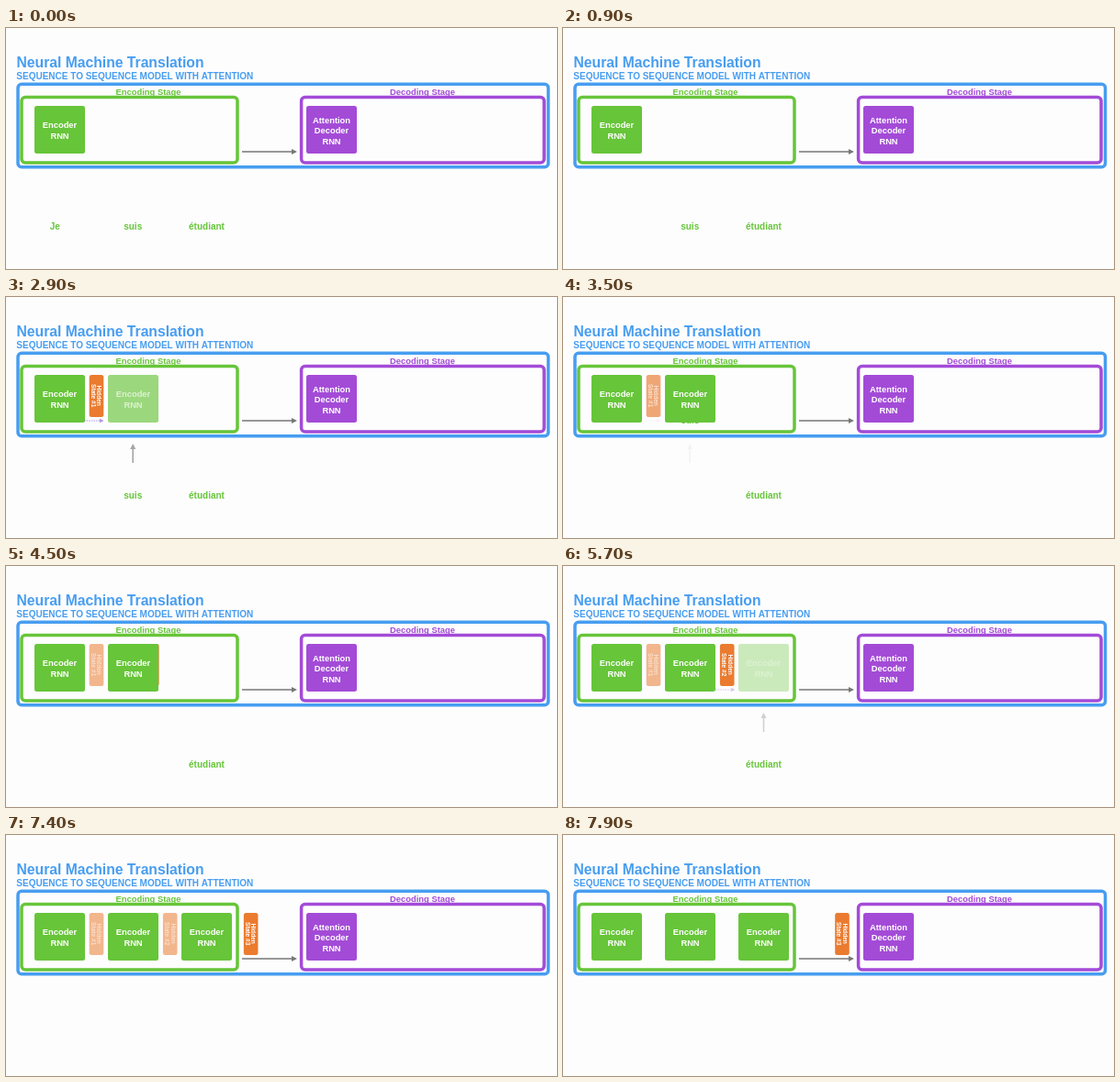
Animation of 600x263 px, one loop 8000 ms. Source, as an HTML page with a canvas:

```html
<!DOCTYPE html>
<html lang="en">
<head>
<meta charset="utf-8">
<title>Neural Machine Translation</title>
<style>
html, body { margin: 0; width: 100%; height: 100%; overflow: hidden; background: #fdfdfe; }
canvas { display: block; }
</style>
</head>
<body>
<canvas id="stage" width="600" height="263"></canvas>
<script>
const ctx = document.getElementById('stage').getContext('2d');
const LOOP = 8000;
const BLUE = '#479df0', GREEN = '#67c539', PURPLE = '#a34bd7', ORANGE = '#ea7b2f', GRAY = '#777';

// Each step: word enters its encoder, then a hidden state slides out.
const steps = [
  { word: 'Je', wordX: 53.3, x: 58.5, enter: 50, slide: 1500, stateX: 98.5 },
  { word: 'suis', wordX: 138.2, x: 138.5, appear: [2680, 340], enter: 3130, slide: 4250, stateX: 178.7, link: 85 },
  { word: 'étudiant', wordX: 218.5, x: 218.5, appear: [5560, 420], enter: 6050, slide: 7140, stateX: 304, link: 166 }
];

const progress = (t, start, length) => Math.min(1, Math.max(0, (t - start) / length));
const ease = p => p < 0.5 ? 4 * p ** 3 : 1 - (2 - 2 * p) ** 3 / 2;
const mix = (a, b, p) => a + (b - a) * p;

function text(str, x, y, size, color, align = 'center') {
  ctx.font = `bold ${size}px "Liberation Sans", Arial, sans-serif`;
  ctx.textAlign = align;
  ctx.fillStyle = color;
  ctx.fillText(str, x, y);
}

function frame(x, y, w, h, color) {
  ctx.strokeStyle = color;
  ctx.lineWidth = 3.5;
  ctx.beginPath();
  ctx.roundRect(x, y, w, h, 4);
  ctx.stroke();
}

function block(x, y, w, h, color) {
  ctx.fillStyle = color;
  ctx.beginPath();
  ctx.roundRect(x, y, w, h, 2.5);
  ctx.fill();
}

function arrow(x, y, length, angle, color, width, head, dash = []) {
  ctx.save();
  ctx.translate(x, y);
  ctx.rotate(angle);
  ctx.strokeStyle = ctx.fillStyle = color;
  ctx.lineWidth = width;
  ctx.setLineDash(dash);
  ctx.beginPath();
  ctx.moveTo(0, 0);
  ctx.lineTo(length - head, 0);
  ctx.stroke();
  ctx.beginPath();
  ctx.moveTo(length, 0);
  ctx.lineTo(length - head, -head / 2);
  ctx.lineTo(length - head, head / 2);
  ctx.fill();
  ctx.restore();
}

function cell(x, color, lines) {
  block(x - 27.5, 85, 55, 52, color);
  const top = 115.2 - (lines.length - 1) * 5.75;
  lines.forEach((line, i) => text(line, x, top + i * 11.4, 9.35, '#fff'));
}

function hiddenState(x, number) {
  block(x - 7.8, 85, 15.6, 46, ORANGE);
  ctx.save();
  ctx.translate(x, 107.7);
  ctx.rotate(Math.PI / 2);
  text('Hidden', 0, -0.8, 6.6, '#fff');
  text('State #' + number, 0, 5.8, 6.6, '#fff');
  ctx.restore();
}

function drawScenery() {
  ctx.fillStyle = '#fdfdfe';
  ctx.fillRect(0, 0, 600, 263);
  text('Neural Machine Translation', 11.5, 43, 15.7, BLUE, 'left');
  text('SEQUENCE TO SEQUENCE MODEL WITH ATTENTION', 11.3, 55.7, 10, BLUE, 'left');
  text('Encoding Stage', 155, 72.5, 9.4, GREEN);
  text('Decoding Stage', 453.5, 72.5, 9.4, PURPLE);
  frame(13, 61.3, 577.5, 90.5, BLUE);
  frame(17, 75.6, 235, 71.4, GREEN);
  frame(321.6, 75.6, 264.4, 71.4, PURPLE);
  arrow(257, 135, 60, 0, GRAY, 1.7, 6);
  cell(354.5, PURPLE, ['Attention', 'Decoder', 'RNN']);
}

function drawStep(step, index, t) {
  const shown = step.appear ? progress(t, ...step.appear) : 1;
  const entered = ease(progress(t, step.enter, 600));

  if (entered < 1) {
    text(step.word, mix(step.wordX, step.x, entered), mix(220, 115, entered), 10, GREEN);
  }

  if (step.link) {
    ctx.globalAlpha = shown * (1 - progress(t, step.enter, 400));
    arrow(step.wordX, 181, 21, -Math.PI / 2, GRAY, 1.6, 6);
    arrow(step.link, 135, 21.5, 0, '#8a5fd0', 1, 4.5, [1.6, 1]);
  }

  if (t >= step.slide) {
    const next = steps[index + 1];
    const dimmed = next ? mix(1, 0.55, progress(t, next.enter, 500)) : 1;
    const left = next ? 1 - progress(t, 7450, 380) : 1;
    ctx.globalAlpha = dimmed * left;
    hiddenState(mix(step.x, step.stateX, ease(progress(t, step.slide, 500))), index + 1);
  }

  ctx.globalAlpha = shown;
  cell(step.x, GREEN, ['Encoder', 'RNN']);
  ctx.globalAlpha = 1;
}

function render(now) {
  const t = now % LOOP;
  drawScenery();
  steps.forEach((step, i) => drawStep(step, i, t));
  requestAnimationFrame(render);
}
requestAnimationFrame(render);
</script>
</body>
</html>
```
